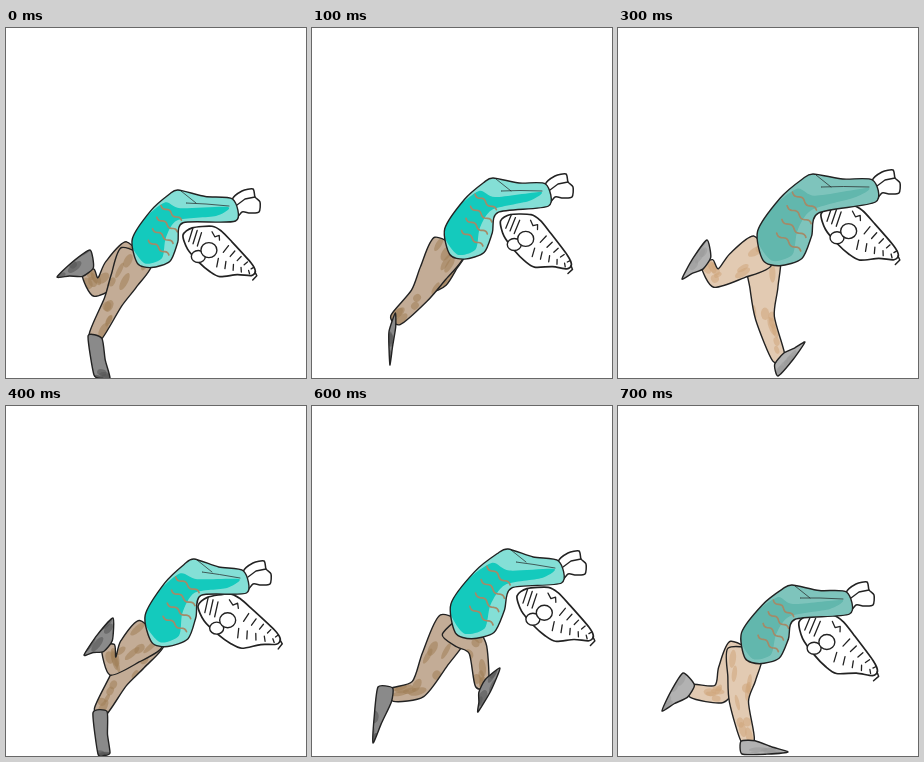
An HTML page with a canvas that plays this animation: 300 px wide and 350 px high, repeating every 800 ms.

```html
<!DOCTYPE html>
<html lang="en">
<head>
<meta charset="utf-8">
<title>Runner</title>
<style>
html, body { margin: 0; width: 100%; height: 100%; overflow: hidden; background: #fff; }
canvas { display: block; }
</style>
</head>
<body>
<canvas id="stage" width="300" height="350"></canvas>
<script>
const ctx = document.getElementById('stage').getContext('2d');
const INK = '#222';
const BRIGHT = { sleeve: '#84dfd6', shirt: '#14cabd', cloth: '#c3ac96', stain: '#a08058', shoe: '#8a8a8a', smudge: '#555' };
const PALE = { sleeve: '#7ec4bc', shirt: '#62b7ad', cloth: '#e2cab2', stain: '#cfa67d', shoe: '#b2b2b2', smudge: '#999' };

// Joints. body: shoulder, hem, cuff; head: back, nose; legs: knee, ankle, heel, toe
const pose = (paint, body, head, far, near) => ({ paint, joints: [body, head, far, near].map(
  row => row.split(' ').map(p => p.split(',').map(Number))) });
const keys = [
  pose(BRIGHT, '172,162 144,239 228,182', '177,207 249,244',
    '90,259 82,244 84,222 51,249', '107,274 89,309 88,347 104,350'),
  pose(BRIGHT, '190,138 158,222 242,152', '200,179 269,231',
    '163,244 150,273 171,269 139,301', '107,262 78,275 66,260 52,324'),
  pose(PALE, '195,146 160,237 256,163', '203,186 280,228',
    '147,290 161,331 160,348 187,314', '98,250 89,235 89,212 64,251'),
  pose(BRIGHT, '188,153 160,240 239,176', '192,200 274,234',
    '112,275 94,306 92,348 104,347', '107,260 102,240 107,212 78,249'),
  pose(BRIGHT, '196,143 158,232 248,166', '205,190 281,231',
    '106,283 80,289 66,281 61,337', '166,244 170,280 188,262 166,306'),
  pose(PALE, '174,179 140,257 230,197', '181,216 259,266',
    '101,288 73,285 65,267 44,305', '121,296 130,335 124,348 170,346')
];

const add = (p, x, y) => [p[0] + x, p[1] + y];
const mix = (a, b, t) => [a[0] + (b[0] - a[0]) * t, a[1] + (b[1] - a[1]) * t];
const unit = (a, b) => {
  const d = Math.hypot(b[0] - a[0], b[1] - a[1]) || 1;
  return [(b[0] - a[0]) / d, (b[1] - a[1]) / d];
};
// Local coordinates: u runs from a to b, v at a right angle to it
const frame = (a, b) => ([u, v]) => {
  const dx = b[0] - a[0], dy = b[1] - a[1];
  return [a[0] + dx * u - dy * v, a[1] + dy * u + dx * v];
};
const halfway = (a, b) => ({ paint: a.paint, joints: a.joints.map((row, i) =>
  row.map((p, j) => mix(p, b.joints[i][j], 0.5))) });

const [p0, p1, p2, p3, p4, p5] = keys;
const cycle = [p0, halfway(p0, p1), p1, p2, p3, halfway(p3, p4), p4, p5];

let seed = 1;
const random = () => (seed = seed * 16807 % 2147483647) / 2147483647;

// Smooth closed curve through the points
function blob(pts, bend = 0.13) {
  const path = new Path2D(), n = pts.length;
  path.moveTo(...pts[0]);
  pts.forEach((b, i) => {
    const a = pts[(i + n - 1) % n], c = pts[(i + 1) % n], d = pts[(i + 2) % n];
    path.bezierCurveTo(
      b[0] + (c[0] - a[0]) * bend, b[1] + (c[1] - a[1]) * bend,
      c[0] - (d[0] - b[0]) * bend, c[1] - (d[1] - b[1]) * bend, ...c);
  });
  return path;
}

function oval([x, y], rx, ry, turn = 0) {
  const path = new Path2D();
  path.ellipse(x, y, rx, ry, turn, 0, 7);
  return path;
}

function shape(path, fill, width = 1.4, shade) {
  ctx.fillStyle = fill;
  ctx.fill(path);
  if (shade) {
    ctx.save();
    ctx.clip(path);
    shade();
    ctx.restore();
  }
  ctx.strokeStyle = INK;
  ctx.lineWidth = width;
  ctx.stroke(path);
}

function line(pts, width = 1.3, color = INK) {
  ctx.strokeStyle = color;
  ctx.lineWidth = width;
  ctx.beginPath();
  pts.forEach(p => ctx.lineTo(...p));
  ctx.stroke();
}

// Loose brush marks scattered from a to b
function dabs(a, b, color, spread) {
  const [dx, dy] = unit(a, b);
  ctx.fillStyle = color;
  ctx.globalAlpha = 0.55;
  for (let i = 0; i < 5; i++) {
    const off = (random() - 0.5) * spread, at = add(mix(a, b, random()), -dy * off, dx * off);
    ctx.fill(oval(at, 4 + random() * 6, 2 + random() * 2.5, Math.atan2(dy, dx)));
  }
  ctx.globalAlpha = 1;
}

function leg(hip, [knee, ankle, heel, toe], paint) {
  const bones = [hip, mix(hip, knee, 0.55), knee, ankle], girth = [17, 14, 9.5, 6.5];
  const left = [], right = [];
  bones.forEach((p, i) => {
    const before = i ? unit(bones[i - 1], p) : [0, 0];
    const after = i < 3 ? unit(p, bones[i + 1]) : [0, 0];
    const [x, y] = unit([0, 0], add(before, ...after)), g = girth[i];
    left.push(add(p, -y * g, x * g));
    right.unshift(add(p, y * g, -x * g));
  });
  shape(blob([...left, ...right]), paint.cloth, 1.4, () => {
    dabs(hip, knee, paint.stain, 24);
    dabs(knee, ankle, paint.stain, 12);
  });

  const [tx, ty] = unit(heel, toe), mid = mix(heel, toe, 0.5), [sx, sy] = unit(ankle, mid);
  shape(blob([
    add(ankle, tx * 7, ty * 7), add(mix(ankle, toe, 0.55), tx * 2, ty * 2), toe,
    add(mid, sx * 2, sy * 2), heel, add(ankle, -tx * 7, -ty * 7)
  ], 0.1), paint.shoe, 1.4, () => dabs(heel, toe, paint.smudge, 8));
}

function head(back, nose) {
  const at = frame(back, nose);
  shape(blob([
    [0, 0], [.13, .13], [.33, .21], [.5, .25], [.64, .25], [.82, .13], [.98, .06],
    [1, -.01], [.9, -.08], [.58, -.2], [.4, -.26], [.27, -.26], [.06, -.13]
  ].map(at)), '#fff', 1.7);
  // Wrinkles across the narrowing snout
  for (let u = 0.54; u < 0.95; u += 0.1) {
    const w = 0.36 - u * 0.32;
    line([[u + .02, -w * .75], [u, -w * .2]].map(at));
    line([[u - .02, w * .3], [u + .01, w * .85]].map(at));
  }
  for (let u = 0.07; u < 0.2; u += 0.06) line([[u, -.13], [u + .03, .04]].map(at));
  line([[.3, -.2], [.36, -.16], [.4, -.2], [.43, -.15]].map(at));
  shape(oval(at([.29, .15]), 7, 6), '#fff');
  shape(oval(at([.37, .02]), 8, 7.5), '#fff');
  line([[1, 0], [1.04, .03], [1.02, .1]].map(at), 1.5);
}

function hands(cuff) {
  const at = ([x, y]) => add(cuff, x, y);
  shape(blob([
    [-2, -10], [8, -19], [19, -21], [21, -13], [26, -8], [25, 2], [16, 3], [8, 2], [1, 9]
  ].map(at)), '#fff', 1.5);
  line([[21, -13], [11, -11], [3, -5]].map(at));
}

function stripe(a, b) {
  const at = frame(a, b), pts = [];
  for (let u = 0; u <= 1; u += 0.05) pts.push(at([u, Math.sin(u * 13) * 0.05]));
  line(pts, 1.7, '#a48a68');
}

function torso(at, shoulder, cuff, paint) {
  const top = add(cuff, -1.5, -11), low = add(cuff, 1.5, 11);
  const body = [[.354, -.195], [.6, -.215], [.85, -.205], [1, -.02], [1.01, .16], [.75, .32], [.35, .225], [.09, .085]];
  shape(blob([shoulder, add(mix(shoulder, top, 0.5), 0, 2), top, low, ...body.map(at)]), paint.sleeve, 1.4, () => {
    ctx.fillStyle = paint.shirt;
    ctx.fill(blob([
      at([.2, -.1]), add(cuff, -6, -3), add(cuff, -18, 6),
      ...[[.35, -.12], [.6, -.06], [.85, -.1], [.98, .08], [.8, .32], [.5, .28], [.2, .1]].map(at)
    ]));
    for (let u = 0.25; u < 0.8; u += 0.15) stripe(at([u, .13]), at([u + .09, -.18]));
  });
  line([add(shoulder, 3, 1), add(shoulder, 18, 13)], 0.7);
  line([add(shoulder, 8, 13), add(mix(shoulder, cuff, 0.5), 0, 4), add(cuff, -5, -4)], 0.7);
}

function draw({ paint, joints: [[shoulder, hem, cuff], skull, far, near] }) {
  const at = frame(shoulder, hem), hip = at([.92, .2]);
  ctx.fillStyle = '#fff';
  ctx.fillRect(0, 0, 300, 350);
  seed = 1 + Math.round(hip[0] * 97);
  leg(hip, far, paint);
  leg(hip, near, paint);
  head(...skull);
  hands(cuff);
  torso(at, shoulder, cuff, paint);
}

ctx.lineJoin = ctx.lineCap = 'round';
function tick() {
  draw(cycle[Math.floor(performance.now() % 800 / 100)]);
  requestAnimationFrame(tick);
}
tick();
</script>
</body>
</html>
```
